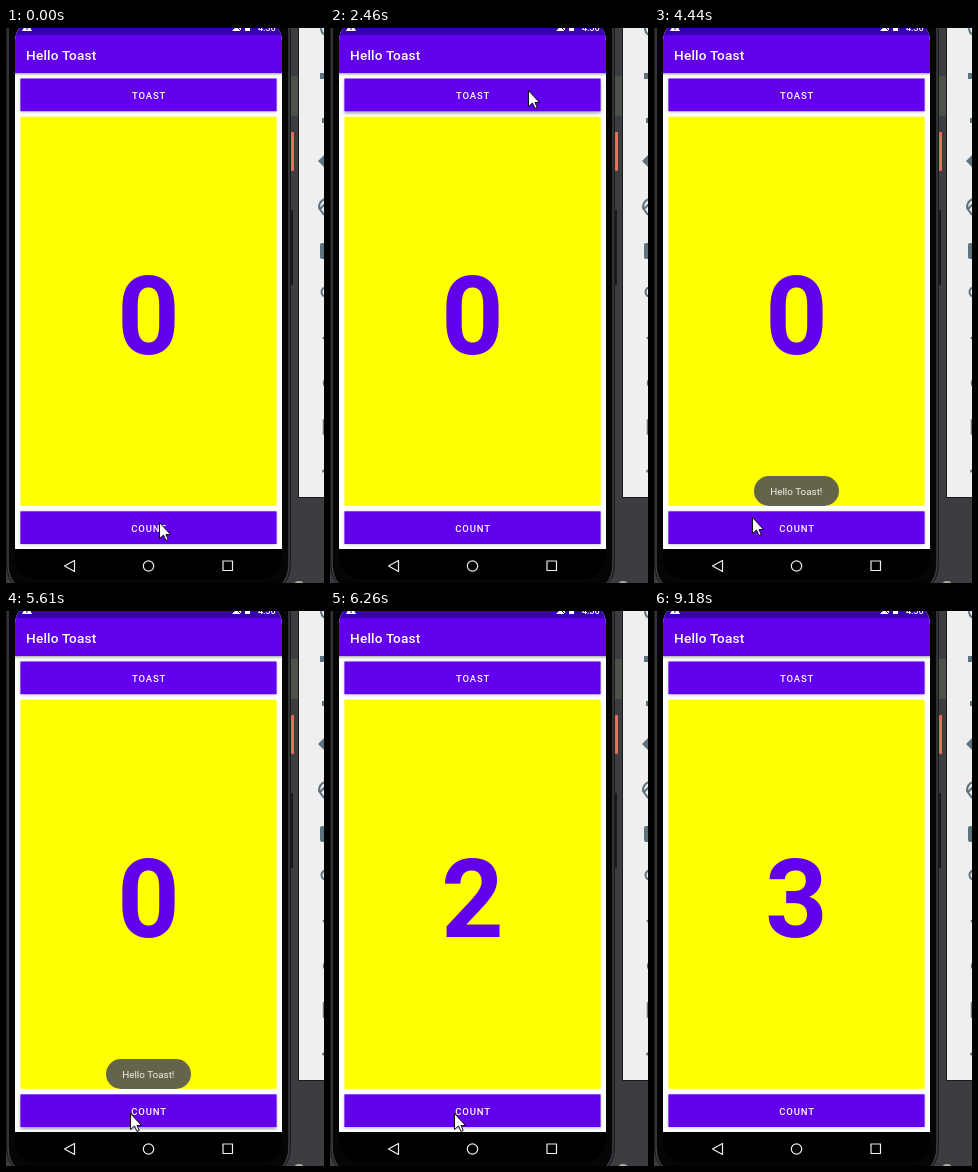
Recreate the animation shown at these times as an HTML page. Size 318 by 555 pixels, loop 9.74 s.

```html
<!DOCTYPE html>
<html lang="en">
<head>
<meta charset="utf-8">
<title>Hello Toast</title>
<style>
  html, body { margin: 0; width: 100%; height: 100%; overflow: hidden; background: #3b3d41; }
  svg { display: block; width: 100vw; height: 100vh; }
  text { font-family: Roboto, sans-serif; fill: #fff; }
  .label { font-size: 9.5px; font-weight: 500; letter-spacing: .85px; text-anchor: middle; }
  .nav { fill: none; stroke: #eee; stroke-width: 1.2; stroke-linejoin: round; }
  .tool { fill: #5d737e; }
  .line { fill: none; stroke: #5d737e; stroke-width: 2; }
  .gray { fill: none; stroke: #777; stroke-width: 1.5; }
  .accent { fill: #6200ee; }
</style>
</head>
<body>
<svg viewBox="0 0 318 555" preserveAspectRatio="none">
  <defs>
    <filter id="soft" x="-5%" y="-40%" width="110%" height="180%"><feGaussianBlur stdDeviation="1.4"/></filter>
    <linearGradient id="drop" x2="0" y2="1">
      <stop stop-color="#b0b0b0"/><stop offset="1" stop-color="#fff"/>
    </linearGradient>
    <clipPath id="screen"><rect x="9" y="-9" width="267" height="560" rx="22"/></clipPath>
  </defs>

  <!-- desktop -->
  <rect width="318" height="555" fill="#3b3d41"/>
  <rect x="285" y="48" width="8" height="40" fill="#4b5249"/>
  <ellipse cx="293" cy="555" rx="4" ry="2" fill="#a9aca5"/>

  <!-- phone body -->
  <path d="M0 0H285V536Q285 548 279 555H6Q0 548 0 536Z" fill="#1c1d1f"/>
  <path d="M2 0V536Q2 548 8 555M283 0V536Q283 548 277 555" fill="none" stroke="#484a4d"/>
  <path d="M3 0H282V536Q282 547 276 555H9Q3 547 3 536Z" fill="#050506"/>
  <rect x="285" y="104" width="3" height="39" rx="1" fill="#e5705b"/>
  <rect x="285" y="182" width="2" height="75" fill="#17181a"/>

  <!-- emulator tools -->
  <rect x="292" width="26" height="470" fill="#191a1c"/>
  <rect x="293" width="25" height="469" fill="#efefef"/>
  <path class="line" d="M315 0Q315 5 319 7"/>
  <path class="tool" d="M314 45H318V51H314ZM316 90H318V95H316ZM312 133L318 127V139ZM314 217Q314 215 316 215H318V231H316Q314 231 314 229Z"/>
  <path class="line" d="M319 171Q313 173 313 180L318 187M314 181L319 176"/>
  <circle class="line" cx="320" cy="264" r="4.5"/>
  <path d="M316 310L318 308.500V311.500Z" fill="#777"/>
  <circle class="gray" cx="322" cy="355" r="4.5"/>
  <path class="gray" d="M319 392H317.500V406H319"/>
  <circle cx="317.500" cy="443" r="1.500" fill="#777"/>

  <!-- app -->
  <g clip-path="url(#screen)">
    <rect x="9" width="267" height="521" fill="#fff"/>
    <rect x="9" y="-9" width="267" height="16" fill="#3700b3"/>
    <rect class="accent" x="9" y="7" width="267" height="38"/>
    <rect x="9" y="45" width="267" height="3" fill="url(#drop)"/>
    <path d="M16 3L21 -6L26 3ZM226 3H235V-6ZM239 -6H244V3H239Z" fill="#fff"/>
    <path d="M21 -1V2M232 0L235 3" stroke="#3700b3"/>
    <text x="252" y="3" font-size="9" font-weight="500">4:36</text>
    <text x="20" y="32" font-size="13.6" font-weight="500" letter-spacing=".22">Hello Toast</text>
    <rect id="topShade" x="14.400" width="256.200" height="32.700" filter="url(#soft)"/>
    <rect id="lowShade" x="14.400" width="256.200" height="32.700" filter="url(#soft)"/>
    <rect x="14.400" y="88.700" width="256.200" height="389.100" fill="#ff0"/>
    <rect class="accent" x="14.400" y="50.500" width="256.200" height="32.700"/>
    <rect class="accent" x="14.400" y="483.300" width="256.200" height="32.700"/>
    <text class="label" x="143" y="71">TOAST</text>
    <text class="label" x="143" y="503.500">COUNT</text>
    <text id="count" x="142.500" y="326" font-size="108.800" font-weight="700" text-anchor="middle" style="fill:#6200ee">0</text>
    <rect x="9" y="521" width="267" height="34"/>
  </g>

  <g id="toast">
    <rect x="100" y="448" width="85" height="30" rx="15" fill="#64644b"/>
    <text x="142.300" y="466.800" font-size="9.900" text-anchor="middle" style="fill:#efefe9">Hello Toast!</text>
  </g>

  <!-- navigation bar -->
  <path class="nav" d="M58.500 538L68.500 532.500V543.500Z"/>
  <circle class="nav" cx="142.500" cy="538" r="5.200"/>
  <rect class="nav" x="217" y="533" width="9.500" height="9.500"/>

  <path id="cursor" d="M.5 .5V16.500L4.500 13L7 18.500L9.200 17.500L7 12.500H11.500Z" fill="#fff" stroke="#111"/>
</svg>
<script>
const LOOP = 9740, STEP = 130;
const el = id => document.getElementById(id);
const clamp = v => Math.min(1, Math.max(0, v));

// Hand movements: each curve starts where the previous one ended.
const home = [153, 494];
const moves = [
  { start: 0, end: 420, bend: [138, 577], to: [222, 37] },
  { start: 420, end: 730, bend: [219, 37], to: [198, 62] },
  { start: 3350, end: 3880, bend: [-4, 63], to: [-6, 399] },
  { start: 4140, end: 4290, bend: [70, 430], to: [147, 470] },
  { start: 4290, end: 4560, bend: [88, 496], to: [69, 493] },
  { start: 4560, end: 4800, bend: [97, 497], to: [124, 502] },
  { start: 8660, end: 9180, bend: [215, 493], to: [330, 590] }
];
const toastTaps = [{ down: 2460, up: 2840 }];
const countTaps = [{ down: 5610, up: 5750 }, { down: 5990, up: 6140 }, { down: 6510, up: 6790 }];

function progress(t, start, end) {
  const n = Math.round((end - start) / STEP);
  return clamp(Math.floor((t - start) / (end - start) * n + .1) / n);
}

function pointer(t) {
  let from = home;
  for (const { start, end, bend, to } of moves) {
    const u = progress(t, start, end), v = 1 - u;
    if (u < 1) return from.map((p, i) => v * v * p + 2 * u * v * bend[i] + u * u * to[i]);
    from = to;
  }
  return from;
}

const pressure = (taps, t) => Math.max(...taps.map(({ down, up }) =>
  t < down ? 0 : 1 - progress(t, up - STEP, up + 2 * STEP)));

function shade(id, y, press) {
  el(id).setAttribute("y", y + .6 + 1.6 * press);
  el(id).setAttribute("opacity", .25 + .1 * press);
}

function draw(t) {
  el("cursor").setAttribute("transform", `translate(${pointer(t).map(Math.round)})`);
  shade("topShade", 50.5, pressure(toastTaps, t));
  shade("lowShade", 483.3, pressure(countTaps, t));
  el("toast").setAttribute("opacity", progress(t, 2720, 3080) - progress(t, 5860, 6260));
  el("count").textContent = countTaps.filter(tap => tap.up <= t).length;
}

const start = performance.now();
function tick() {
  draw((performance.now() - start) % LOOP);
  requestAnimationFrame(tick);
}
tick();
</script>
</body>
</html>
```
